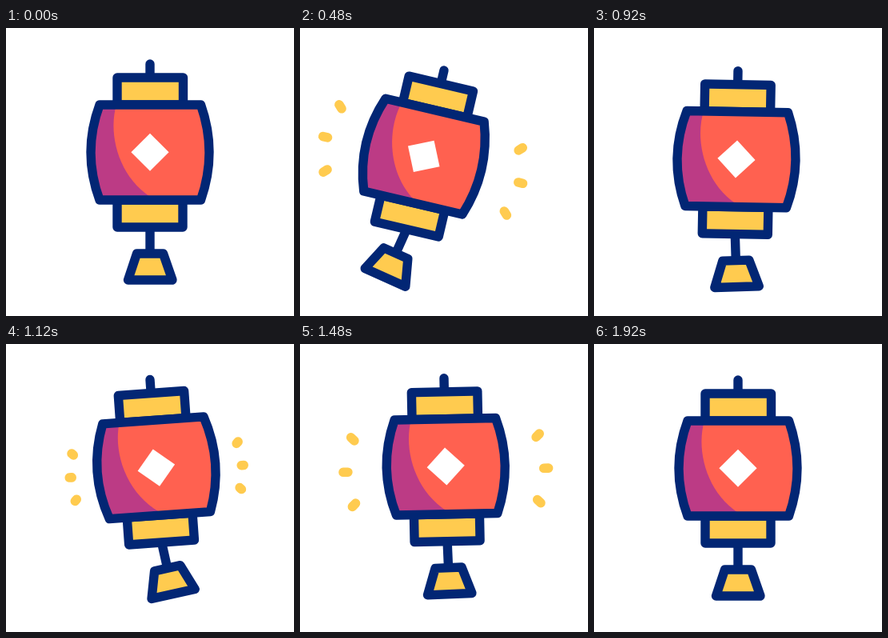
Write an HTML page that moves like this. It is 360x360 px and loops after 2 s.

```html
<!DOCTYPE html>
<html lang="en">
<head>
<meta charset="utf-8">
<title>Swinging lantern</title>
<style>
  html, body { margin: 0; width: 100%; height: 100%; overflow: hidden; background: #fff; }
  svg { display: block; width: 100vw; height: 100vh; }
  .ink { stroke: #022674; stroke-width: 11.4; stroke-linecap: round; stroke-linejoin: round; }
  .gold { fill: #ffcb4f; }
  #rays line { stroke: #ffcb4f; stroke-width: 11.6; stroke-linecap: round; }
</style>
</head>
<body>
<svg viewBox="0 0 360 360">
  <defs>
    <path id="barrel" d="M117 96H243.5Q264.5 155.5 243.5 215H117Q95 155.5 117 96Z"/>
    <clipPath id="inside"><use href="#barrel"/></clipPath>
  </defs>
  <g id="lantern">
    <g id="rays"></g>
    <g id="tassel" class="ink gold">
      <path d="M180 249V282"/>
      <path d="M163.5 282H196.5L208 315H152.5Z"/>
    </g>
    <g class="ink gold">
      <path d="M180 45V62"/>
      <path d="M139 62H221.5V96H139Z"/>
      <path d="M139 215H221V249H139Z"/>
    </g>
    <use href="#barrel" fill="#bc3b85"/>
    <path clip-path="url(#inside)" fill="#ff6150" d="M138 96C127 133 141 190 187 215H265V96Z"/>
    <use href="#barrel" class="ink" fill="none"/>
    <path id="diamond" fill="#fff" d="M180 131.8L203.6 155.3L180 178.8L156.4 155.3Z"/>
  </g>
</svg>
<script>
const LOOP = 2000, STEP = 40, REST = 1920;
const $ = id => document.getElementById(id);
const clamp = u => Math.max(0, Math.min(1, u));
const progress = (t, from, to) => clamp((t - from) / (to - from));
const smooth = u => u * u * (3 - 2 * u);

// Eases from pose to pose, resting for a moment at each beat
function ease(t, beats, poses) {
  return poses.reduce((value, pose, i) =>
    i ? value + (pose - poses[i - 1]) * smooth(progress(t, beats[i - 1], beats[i])) : pose, 0);
}

const swingBeats = [30, 580, 1100, 1290, 1670, REST];
const swing = t => ease(t, swingBeats, [0, 14.5, -4.1, -3.8, 1.5, 0]);
const trail = t => ease(t, swingBeats, [0, 12, -8.5, -7.2, 4.5, 0]);
const drop = t => ease(t, [60, 760, 1300, 1640], [0, 12.3, -4.9, 0]);

const BURST = 1000, REACH = 11;
const rays = [];
for (const side of [-1, 1]) {
  for (const row of [-1, 0, 1]) {
    const line = document.createElementNS("http://www.w3.org/2000/svg", "line");
    $("rays").append(line);
    rays.push({
      line,
      x: 180 + side * (row ? 110 : 117.3),
      y: 160 + row * 35.5,
      dx: side * (row ? Math.SQRT1_2 : 1),
      dy: row * Math.SQRT1_2
    });
  }
}

// Each burst shoots outward, then its tail catches up with its head
function drawRays(t) {
  const phase = t % BURST;
  const visible = phase > 80 && phase < 560;
  $("rays").setAttribute("visibility", visible ? "visible" : "hidden");
  const tail = REACH * (2 * progress(phase, 260, 560) - 1);
  const head = REACH * (2 * progress(phase, 80, 380) - 1);
  for (const { line, x, y, dx, dy } of rays) {
    [tail, head].forEach((offset, i) => {
      line.setAttribute("x" + (i + 1), x + dx * offset);
      line.setAttribute("y" + (i + 1), y + dy * offset);
    });
  }
}

function draw(t) {
  const angle = swing(t);
  $("lantern").setAttribute("transform", `translate(0 ${drop(t)}) rotate(${angle} 180 45)`);
  $("tassel").setAttribute("transform", `rotate(${trail(t)} 180 249)`);
  $("diamond").setAttribute("transform", `rotate(${angle * 1.5} 180 155.3)`);
  drawRays(t);
}

const start = performance.now();
function tick() {
  const t = (performance.now() - start) % LOOP;
  draw(Math.min(REST, Math.floor(t / STEP) * STEP));
  requestAnimationFrame(tick);
}
tick();
</script>
</body>
</html>
```
